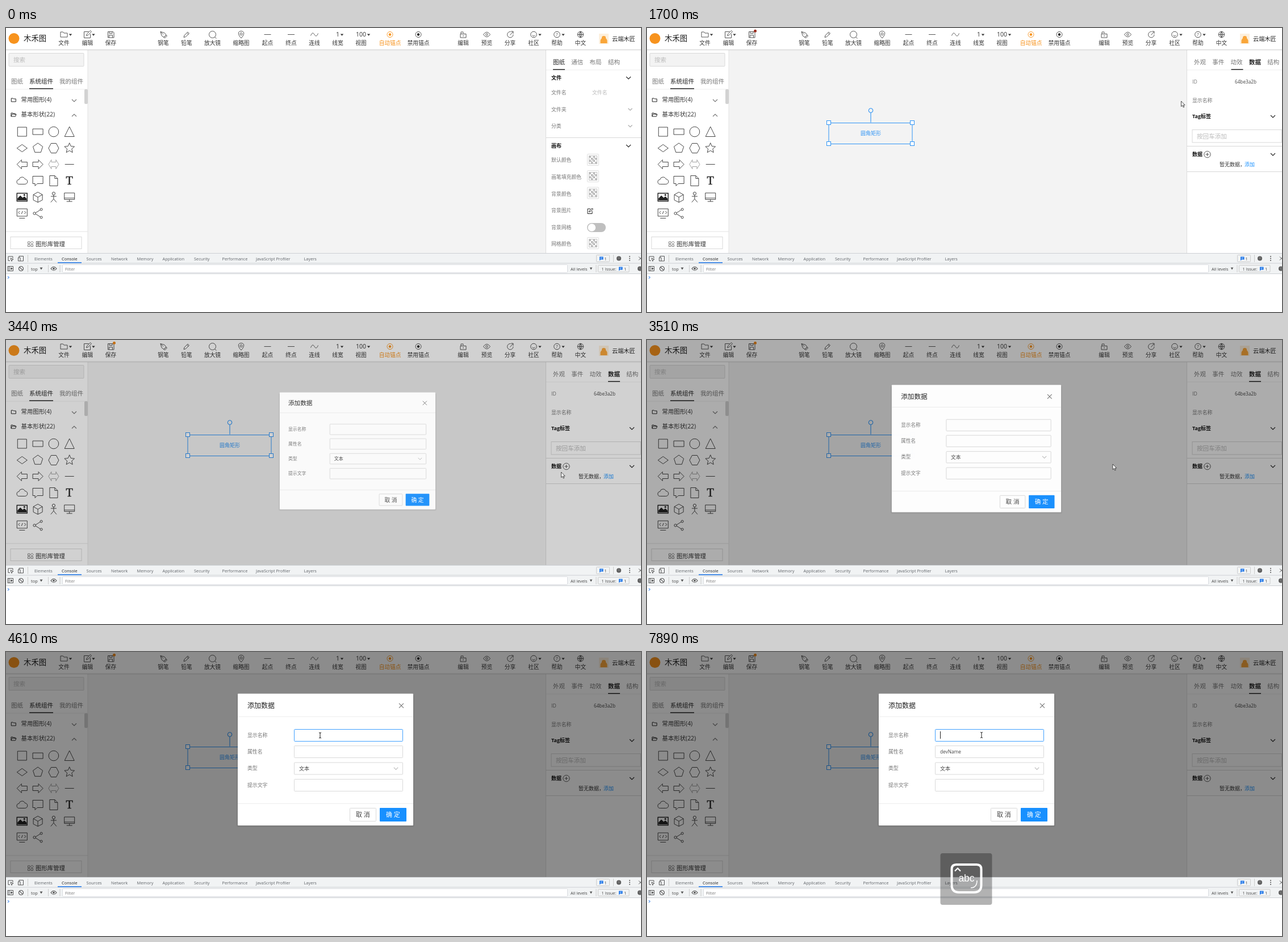
Animation, 1118 px wide and 501 px high, one loop 8 s. Source, as an HTML page:

```html
<!DOCTYPE html>
<html lang="zh-CN">
<head>
<meta charset="utf-8">
<title>Diagram editor</title>
<style>
html, body { margin: 0; width: 100%; height: 100%; overflow: hidden; background: #fff; }
svg { display: block; width: 1118px; height: 501px; }
text { font-family: "Open Sans", "Noto Sans CJK SC", "Noto Sans CJK", sans-serif; white-space: pre; }
</style>
</head>
<body>
<svg id="stage" viewBox="0 0 1118 501"></svg>
<script>
const INK = '#444', DARK = '#222', GREY = '#777', PALE = '#bbb', LINE = '#e2e2e2', BLUE = '#1890ff', ORANGE = '#f7931e';

// Drawing helpers: text is placed by its vertical centre
const text = (x, cy, s, size = 9, fill = INK, extra = '') =>
  `<text x="${x}" y="${cy + size * .36}" font-size="${size}" fill="${fill}" ${extra}>${s}</text>`;
const mid = (x, cy, s, size, fill, extra = '') => text(x, cy, s, size, fill, 'text-anchor="middle" ' + extra);
const bold = 'font-weight="700"', medium = 'font-weight="500"';
const rect = (x, y, w, h, fill, stroke = 'none', r = 0, extra = '') =>
  `<rect x="${x}" y="${y}" width="${w}" height="${h}" rx="${r}" fill="${fill}" stroke="${stroke}" ${extra}/>`;
const icon = (x, y, d, stroke = INK, width = .9, fill = 'none') =>
  `<path transform="translate(${x} ${y})" d="${d}" stroke="${stroke}" stroke-width="${width}" fill="${fill}"/>`;
const solid = (x, y, d, fill = INK) => icon(x, y, d, 'none', 0, fill);
const hline = (x1, x2, y, color = LINE, w = 1) => icon(x1, y, `M0 0H${x2 - x1}`, color, w);
const vline = (x, y1, y2, color = '#ccc') => icon(x, y1, `M0 0V${y2 - y1}`, color, 1);
const circle = (r, x = 0, y = 0) => `M${x - r} ${y}a${r} ${r} 0 1 0 ${2 * r} 0a${r} ${r} 0 1 0 ${-2 * r} 0`;
const polygon = (n, radius) => 'M' + Array.from({ length: n }, (_, i) => {
  const a = i * 2 * Math.PI / n - Math.PI / 2, r = radius(i);
  return `${(r * Math.cos(a)).toFixed(2)} ${(r * Math.sin(a)).toFixed(2)}`;
}).join('L') + 'z';
const down = (x, y, color = DARK, s = 4) => icon(x, y, `M${-s} ${-s / 2}L0 ${s / 2} ${s} ${-s / 2}`, color, 1.1);
const drop = (x, y) => solid(x, y, 'M-2.7-1.5h5.4L0 1.7z', '#333');
const group = (id, body, hidden = true) => `<g id="${id}" ${hidden ? 'visibility="hidden"' : ''}>${body}</g>`;

const FOLDER = 'M-6 4.5v-9h4.5l1.5 2h6v7z';
const EDIT = 'M2-5H-6V6H5V-1M-2 2l1-3 6-6 2 2-6 6z';
const EYE = 'M-6 0Q0-8.5 6 0Q0 8.5-6 0z' + circle(1.8);
const GEAR = circle(3.2) + circle(1.4);

function header() {
  const items = [
    [102, '文件', FOLDER], [143.5, '编辑', EDIT],
    [184.5, '保存', 'M-5-5H4l1.5 1.5V5.5H-5zM-2.5-5v3h5v-3M-3 5.5V1h6v4.5'],
    [277, '钢笔', 'M-5-5L2-3 5 1 1 5-3 2zM-5-5L0 0M1 5L5 1l1.5 1.5-4 4z'],
    [318, '铅笔', 'M-5 5l1-3.5 6-6 2.5 2.5-6 6zM0.5-3L3-.5'],
    [363.5, '放大镜', circle(6) + 'M4 4.5L7 7'],
    [414, '缩略图', 'M0 6.5C-7-1-5.5-6 0-6S7-1 0 6.5z' + circle(2, 0, -1)],
    [460.5, '起点', 'M-6 0H6'], [502, '终点', 'M-6 0H6'],
    [543, '连线', 'M-6.5 2C-4-4-2-3.500 0 0S4 4 6.500-2'],
    [584, '线宽', ''], [625, '视图', ''], [676, '自动锚点', circle(5)], [726, '禁用锚点', circle(5)],
    [805, '编辑', 'M-5-1H5V5.500H-5zM-4-1V-4.500H0V-2M0 1v2.500'],
    [846.5, '预览', EYE],
    [887.5, '分享', 'M1-5a5.200 5.200 0 1 0 4.500 5M0 1L5-5M1.500-5.500H5.500V-1.500'],
    [929, '社区', circle(5.3) + 'M-2.500 1q2.500 3.500 5 0'],
    [970, '帮助', circle(5.3)],
    [1011.5, '中文', circle(5.3) + 'M-5.300 0H5.300M0-5.300V5.300M0-5.300Q-5 0 0 5.300Q5 0 0-5.300']
  ];
  const offset = { 143.5: 0, 929: 0 };
  return rect(0, 38, 1118, 2, '#000', 'none', 0, 'opacity=".05"') + rect(0, 0, 1118, 38, '#fff') +
    hline(0, 1118, 38, '#dcdcdc') + solid(14, 18.5, circle(9.5), ORANGE) + text(31, 18.5, '木禾图', 13.4, DARK) +
    items.map(([x, name, d]) => {
      const hot = name === '自动锚点';
      return icon(x, 11.5, d, hot ? ORANGE : INK) + mid(x, 27, name, 9.7, hot ? ORANGE : '#333');
    }).join('') +
    solid(676, 11.5, circle(2.2), ORANGE) + solid(726, 11.5, circle(2.2), DARK) +
    mid(584, 11.5, '1', 10.5, '#333') + mid(625, 11.5, '100', 10.5, '#333') + mid(970, 11.5, '?', 8) +
    [113.5, 154, 591.5, 638.5, 940, 981].map(x => drop(x, 12)).join('') +
    rect(1044, 10, 17, 18, '#fdf0dd') + solid(1052.5, 20, 'M-6 7V2Q-5-1-3.500-2Q-4-6 0-6T3.500-2Q5-1 6 2V7z', '#f9a63a') +
    text(1067, 19, '云端木匠', 10.2, DARK);
}

function palette() {
  const shapes = [
    'M-8-8H8V8H-8z', 'M-9-5H9V5H-9z', circle(8.8), 'M0-9L8.500 8.500H-8.500z',
    'M0-6.500L9 0 0 6.500-9 0z', polygon(5, () => 9), 'M-4.500-8.500h9L9 0 4.500 8.500h-9L-9 0z', polygon(10, i => i % 2 ? 4.3 : 9.3),
    'M-9 0L-1-8v4H9v8H-1v4z', 'M9 0L1-8v4H-9v8H1v4z', 'M-9 0l5-8v4h8v-4l5 8-5 8v-4h-8v4z', 'M-8 0H8',
    'M-5 6a4 4 0 0 1-.500-8A5.500 5.500 0 0 1 5-3a4.500 4.500 0 0 1 0 9z', 'M-9-8H9V5H-1l-4 4v-4h-4z', 'M-7-9H2l5 5V9H-7zM2-9v5h5', '',
    'M-9-7H9V7H-9z', 'M0-9L8-4.500V5L0 9-8 5v-9.500zM-8-4.500L0 0 8-4.500M0 0V9',
    circle(2.6, 0, -6.5) + 'M0-4V3M-5-1.500H5M0 3L-5 9M0 3L5 9', 'M-9-7.500H9V4H-9zM-9 1.500H9M0 4V7.500M-5 7.500H5',
    'M-9-8H9V5H-9zM-5 8.500H5M-4-4L-6.500-1.500-4 1M4-4L6.500-1.500 4 1M1-4L-1 1', circle(2.2, -6, 0) + circle(2, 6, -7) + circle(2, 6, 7) + 'M-4-1L4-6M-4 1L4 6'
  ];
  const rows = [183, 212, 240.5, 269.5, 298.5, 327];
  return rect(0, 39, 144, 358, '#fff') + vline(144, 39, 397, LINE) +
    rect(5, 44.5, 132, 23, '#f3f3f3', '#d9d9d9', 1) + text(13, 56, '搜索', 10.5, PALE) +
    text(9, 94, '图纸', 10.5, GREY) + text(41, 94, '系统组件', 10.5, DARK, medium) + text(94, 94, '我的组件', 10.5, GREY) +
    hline(0, 144, 108, '#eee') + hline(41, 83, 107, DARK, 1.6) + rect(138, 108, 6, 26, '#d2d2d2', 'none', 2) +
    icon(13.3, 127, 'M-4 3v-6h3l1 1h4v5z', DARK, 1) + text(26.5, 126, '常用图形(4)', 10.4, '#333') + down(120, 128, GREY) +
    icon(13, 153, 'M-4 3v-6h3l1 1h3v2M-4 3l1.500-4H5L3.500 3z', DARK, 1) + text(26.5, 152, '基本形状(22)', 10.4, '#333') +
    icon(120, 154, 'M-4 2L0-2 4 2', GREY, 1.1) +
    shapes.map((d, i) => icon(28.3 + 27.8 * (i % 4), rows[i >> 2], d, i === 10 ? '#999' : '#333')).join('') +
    mid(111.5, 269, 'T', 20, DARK, 'style="font-family:\'Liberation Serif\',serif" stroke="#222" stroke-width=".4"') +
    solid(28.3, 298.5, 'M-8 5.500V2L-3-3 1 1 4-1.500 8 2.500V5.500z' + circle(1.6, 4, -4), DARK) + icon(28.3, 298.5, 'M-9-7H9V7H-9z', DARK, 1.3) +
    hline(0, 144, 359) + rect(8, 368.5, 125, 21, '#fff', '#d9d9d9') +
    icon(43, 381, 'M-4.500-4h3.500v3.500h-3.500zM-4.500 1h3.500v3.500h-3.500zM1 1h3.500v3.500h-3.500zM2.800-5L5.300-2.500 2.800 0 .300-2.500z', GREY) +
    text(52, 381, '图形库管理', 10.4, '#333');
}

const tabs = (names, active) => names.map((s, i) => i === active ? '' : text(963 + i * 32.3, 60.5, s, 10.5, GREY)).join('');
const section = (y, s, x = 1102) => text(960, y, s, 9, '#111', bold) + down(x, y);

function swatch(y) {
  let cells = '';
  for (let i = 0; i < 16; i++)
    if ((i + (i >> 2)) % 2 === 0) cells += rect(1026.5 + i % 4 * 3.5, y - 7 + (i >> 2) * 3.5, 3.5, 3.5, '#bdbdbd');
  return rect(1023.5, y - 10, 20, 20, '#fff', '#ddd', 1) + cells + rect(1026.5, y - 7, 14, 14, 'none', '#c4c4c4') +
    icon(1033.5, y, 'M-3.500-3.500l7 7M3.500-3.500l-7 7', '#aaa');
}

function sheetPanel() {
  const rows = { 默认颜色: 233, 画笔填充颜色: 263, 背景颜色: 292.5, 背景图片: 322, 背景网格: 351.5, 网格颜色: 380.5 };
  return tabs(['图纸', '通信', '布局', '结构'], 0) + text(963, 60.5, '图纸', 10.5, DARK, medium) + hline(963, 984, 73.3, DARK, 1.5) +
    section(88, '文件', 1096) + text(960, 114, '文件名', 8.9, GREY) + text(1032, 114, '文件名', 8.9, PALE) +
    text(960, 144, '文件夹', 8.9, GREY) + down(1099, 143.5, '#aaa', 3.5) +
    text(960, 173, '分类', 8.9, GREY) + down(1099, 173, '#aaa', 3.5) + hline(951, 1118, 193.5, '#d8d8d8') + section(208, '画布', 1096) +
    Object.entries(rows).map(([s, y]) => text(960, y, s, 8.9, GREY)).join('') +
    [233, 262, 291.5, 380].map(y => swatch(y - .5)).join('') + icon(1028, 323, 'M1-4H-4V4.500H4V0M-1.500 1.500l.5-2L4-5l1.500 1.500L.500 1z', DARK, 1) +
    rect(1023, 344, 33, 16, '#bfbfbf', 'none', 8) + solid(1031.3, 352, circle(6.8), '#fff');
}

const dataPanel = () => tabs(['外观', '事件', '动效', '数据', '结构'], 3) +
  `<g id="dataTab">${text(1060, 60.5, '数据', 10.5, DARK, bold)}</g>` + rect(0, 72.5, 21, 1.5, DARK, 'none', 0, 'id="underline"') +
  text(960, 95, 'ID', 8.7, GREY) + text(1035, 95, '64be3a2b', 8.2, INK) + text(960, 127.5, '显示名称', 8.9, GREY) +
  section(156, 'Tag标签') + rect(960, 179.5, 157.5, 22.5, '#fff', '#d9d9d9') + text(968, 191, '按回车添加', 10.6, PALE) +
  hline(951, 1118, 208.5, '#d8d8d8') + section(223, '数据') + icon(986.5, 223, circle(5.7) + 'M-3 0H3M0-3V3', INK) +
  text(1008, 241, '暂无数据，', 9, '#333') + text(1052, 241, '添加', 9, BLUE) + hline(951, 1118, 253.5, '#d8d8d8');

const node = () => rect(320, 167.5, 147, 37, 'none', '#2f94f5') + icon(394, 145.5, circle(3.7) + 'M0 4V21', '#2f94f5', 1.1) +
  [[320, 167], [467, 167], [320, 204], [467, 204]].map(([x, y]) => rect(x - 3.5, y - 3.5, 7, 7, '#fff', '#2f94f5')).join('') +
  mid(394, 186, '圆角矩形', 9, '#2f94f5');

function dialog() {
  const field = (y, s, id) => text(425, y + 10.5, s, 8.9, GREY) + rect(507.5, y + .5, 191, 21, '#fff', '#d9d9d9', 1, `id="${id}"`);
  return rect(406, 75, 313, 234, '#000', 'none', 3, 'opacity=".06"') + rect(408, 73.5, 309, 232.5, '#fff', 'none', 1) +
    text(425, 94.3, '添加数据', 12, DARK) + icon(696, 94.7, 'M-4-4L4 4M4-4L-4 4', GREY, 1.1) + hline(408, 717, 114, '#ececec') +
    field(136, '显示名称', 'nameField') + field(165, '属性名', 'propField') + field(194.5, '类型', 'typeField') + field(224, '提示文字', 'hintField') +
    text(516, 205.3, '文本', 9, INK) + down(686.5, 205.5, PALE, 3.7) + hline(408, 717, 267.5, '#ececec') +
    rect(605.5, 275.5, 46, 23, '#fff', '#d9d9d9', 1) + text(616, 287.3, '取 消', 11, INK) +
    rect(658, 275, 47, 24, BLUE, 'none', 1) + text(669, 287.3, '确 定', 11, '#fff') +
    `<text id="typed" x="516" y="178.500" font-size="8.300" fill="${INK}"></text>` + rect(0, 0, 1, 13, DARK, 'none', 0, 'id="caret"');
}

function devtools() {
  const names = { Elements: 50, Console: 98, Sources: 141.5, Network: 185, Memory: 230.5, Application: 275.5, Security: 331, Performance: 380.5, 'JavaScript Profiler': 440, Layers: 524.5 };
  const badge = (x, y) => solid(x, y, 'M-3-3H3.500V2H-1L-3 4z', '#1a73e8') + icon(x, y, 'M-1.500-1.200H2M-1.500.500H1', '#fff', .6);
  return rect(0, 397, 1118, 104, '#fff') + rect(0, 397, 1118, 36, '#f1f3f4') +
    [397.5, 415, 433.5].map(y => hline(0, 1118, y, '#cdd0d4')).join('') +
    Object.entries(names).map(([s, x]) => text(x, 407, s, 7.4, s === 'Console' ? '#222' : '#5f6368')).join('') + hline(91, 133, 414, '#1a73e8', 1.5) +
    icon(8, 407, 'M-1 3.500H-4V-4H4V-1M0-1l5 2-2 1-1 2.500z', '#555', 1) + icon(26, 407, 'M-1-4.500H4.500V4H-1M-4.500-2H-1V4H-4.500zM-3-2V-4.500H0', '#555', 1) +
    vline(38.5, 400, 413) + rect(1039.5, 400.5, 23, 12, '#f1f3f4', '#ccc', 1) + badge(1048, 406.5) + text(1053.5, 407, '1', 7.4) +
    vline(1069.5, 400, 413) + icon(1079, 406.5, GEAR, '#555', 1.6) + solid(1098, 406.5, circle(1, 0, -3.5) + circle(1) + circle(1, 0, 3.5), '#555') +
    icon(1117, 406.5, 'M-3-3L3 3M3-3L-3 3', '#555', 1) +
    icon(8, 424.5, 'M-5-4H4.500V4H-5zM-2.500-4V4', '#555', 1) + solid(9, 424.5, 'M-1-2.500L3 0-1 2.500z', '#555') +
    icon(26.5, 424.5, circle(4) + 'M-2.800-2.800L2.800 2.800', '#555', 1.2) + vline(38.5, 418, 431) + text(44, 425, 'top', 7.5) + solid(62, 424.5, 'M-2.500-2h5L0 2z', '#555') +
    vline(74.5, 418, 431) + icon(84, 424.5, 'M-5 0Q0-6.500 5 0Q0 6.500-5 0z', '#555', 1.2) + solid(84, 424.5, circle(1.8), '#555') + vline(95, 418, 431) +
    rect(99.5, 417.5, 889, 14, '#fff', '#dadce0', 1) + text(104, 425, 'Filter', 7.4, GREY) +
    text(994, 425, 'All levels', 7.4) + solid(1030, 424.5, 'M-2.300-2h4.600L0 2z', '#555') + vline(1039, 418, 431) +
    rect(1042.5, 418.5, 54.5, 12, '#f1f3f4', '#ccc', 1) + text(1048.5, 425, '1 Issue:', 7.4) + badge(1082, 424.5) + text(1088, 425, '1', 7.4) +
    icon(1116, 424.5, GEAR, '#555', 1.6) + icon(3, 440, 'M0-2L2.500 0 0 2', '#1a73e8', 1);
}

const capsBadge = () => rect(516.5, 355, 91, 91, 'rgba(0,0,0,.3)', 'none', 4) +
  icon(562.5, 399, 'M-18-24H18Q26-24 26-16V12Q26 25 13 25H-13Q-26 25-26 12V-16Q-26-24-18-24z', '#fff', 4) +
  icon(547, 384, 'M-5 2.500L0-2.500 5 2.500', '#fff', 2.2) + icon(576, 411, 'M5-8Q5 5-6 5', '#fff', 1.5) +
  mid(562.5, 399, 'abc', 17.5, '#fff', 'id="caps" style="font-family:\'Liberation Sans\',sans-serif"');

const pointers = () =>
  group('arrow', icon(0, 0, 'M0 0V9.500L2.300 7.500 3.800 11 5.300 10.300 3.800 7H6.700z', '#222', .8, '#fff')) +
  group('hand', icon(0, 0, 'M1.500 8V1Q2.500-.600 3.500 1V5L8 6.200Q9 6.500 8.700 8.500L7.700 13H3L-.500 8.500Q0 6.800 1.500 8z', '#222', .9, '#fff')) +
  group('beam', icon(0, 0, 'M-2-5Q0-5 0-3.500Q0-5 2-5M0-4V4M-2 5Q0 5 0 3.500Q0 5 2 5', '#222', 1));

document.getElementById('stage').innerHTML =
  rect(0, 0, 1118, 501, '#f3f3f3') + group('node', node()) + palette() +
  rect(951, 39, 167, 358, '#fff') + vline(950.5, 39, 397, '#ddd') + hline(951, 1118, 74, '#eee') +
  group('sheet', sheetPanel()) + group('data', dataPanel()) + header() +
  group('dot', solid(190.5, 5.3, circle(2.5), 'inherit')) +
  rect(0, 0, 1118, 397, '#000', 'none', 0, 'id="mask" opacity="0"') + group('dialog', dialog()) +
  devtools() + group('capsBadge', capsBadge()) + pointers();

const el = Object.fromEntries([...document.querySelectorAll('[id]')].map(e => [e.id, e]));
const show = (id, on) => el[id].setAttribute('visibility', on ? 'visible' : 'hidden');
const set = (id, attrs) => { for (const k in attrs) el[id].setAttribute(k, attrs[k]); };

function sample(keys, t) {
  const i = keys.findIndex(k => k[0] > t);
  if (i === 0) return keys[0].slice(1);
  if (i < 0) return keys[keys.length - 1].slice(1);
  const a = keys[i - 1], b = keys[i], p = (t - a[0]) / (b[0] - a[0]);
  return a.slice(1).map((v, j) => v + (b[j + 1] - v) * p);
}

const LOOP = 8000, CLICK = [1062, 241];
const pointerPath = [ // time, x, y
  [70, 943, 467], [290, 640, 350], [570, 130, 200], [780, 52, 180], [850, 52, 180], [1130, 394, 182], [1200, 394, 182],
  [1550, 1070, 60], [1620, 1066, 62], [1690, 940.5, 129], [2460, 1011, 193], [3160, 1060, 240], [3300, 1060, 240], [3370, 1047, 237],
  [3440, 977.5, 233], [3510, 820, 219], [3580, 643, 199], [3720, 600, 172], [4070, 553, 147], [4910, 553, 147], [5320, 543, 175],
  [7310, 543, 175], [7660, 585, 149], [7780, 585, 149], [7850, 589, 146.5]
];
const underlinePath = [[1550, 963], [1690, 1028.5], [1760, 1050], [1830, 1060]];
const opening = [ // time, scale, opacity, mask progress
  [3370, .537, .5, .08], [3440, .887, .92, .4], [3510, .965, .98, .72], [3580, .99, 1, .95], [3650, 1, 1, 1]
];
const keystrokes = [5620, 5690, 5890, 6430, 6640, 6780, 6940];

function render(t) {
  const tick = Math.floor((t - 10) / 70) * 70 + 10;
  const dropped = t >= 1200, open = t >= 3370;
  show('node', dropped);
  show('sheet', !dropped);
  show('data', dropped);
  show('dot', dropped);
  set('dot', { fill: open ? '#f08a1c' : '#9c2f22' });
  set('dataTab', { opacity: t >= 1600 ? 1 : .55 });
  set('underline', { x: sample(underlinePath, tick)[0] });

  const [scale, alpha, shade] = sample(opening, tick);
  show('dialog', open);
  set('mask', { opacity: open ? .45 * shade : 0 });
  set('dialog', { opacity: alpha, transform: `translate(${CLICK}) scale(${scale}) translate(${CLICK.map(v => -v)})` });

  const inProp = t >= 5290 && t < 7610;
  const inName = t >= 4070 && t < 5290 || t >= 7610;
  set('nameField', { stroke: inName ? '#40a0ff' : '#d9d9d9' });
  set('propField', { stroke: inProp ? '#40a0ff' : '#d9d9d9' });
  el.typed.textContent = 'devName'.slice(0, keystrokes.filter(k => t >= k).length);
  const caretOff = t >= 4610 && t < 5140 || t >= 7610 && t < 7820;
  set('caret', {
    x: inProp ? Math.round(516 + el.typed.getComputedTextLength()) : 516,
    y: inProp ? 169 : 140,
    opacity: (inName || inProp) && !caretOff ? 1 : 0
  });

  show('capsBadge', t >= 6290);
  el.caps.textContent = t < 6570 ? 'ABC' : 'abc';

  const [x, y] = sample(pointerPath, tick);
  const pointer = t < 3580 ? 'arrow' : t < 3720 ? 'hand' : 'beam';
  for (const id of ['arrow', 'hand', 'beam']) {
    show(id, id === pointer && t >= 70);
    set(id, { transform: `translate(${x} ${y})` });
  }
}

const start = performance.now();
function loop() {
  render((performance.now() - start) % LOOP);
  requestAnimationFrame(loop);
}
loop();
</script>
</body>
</html>
```
